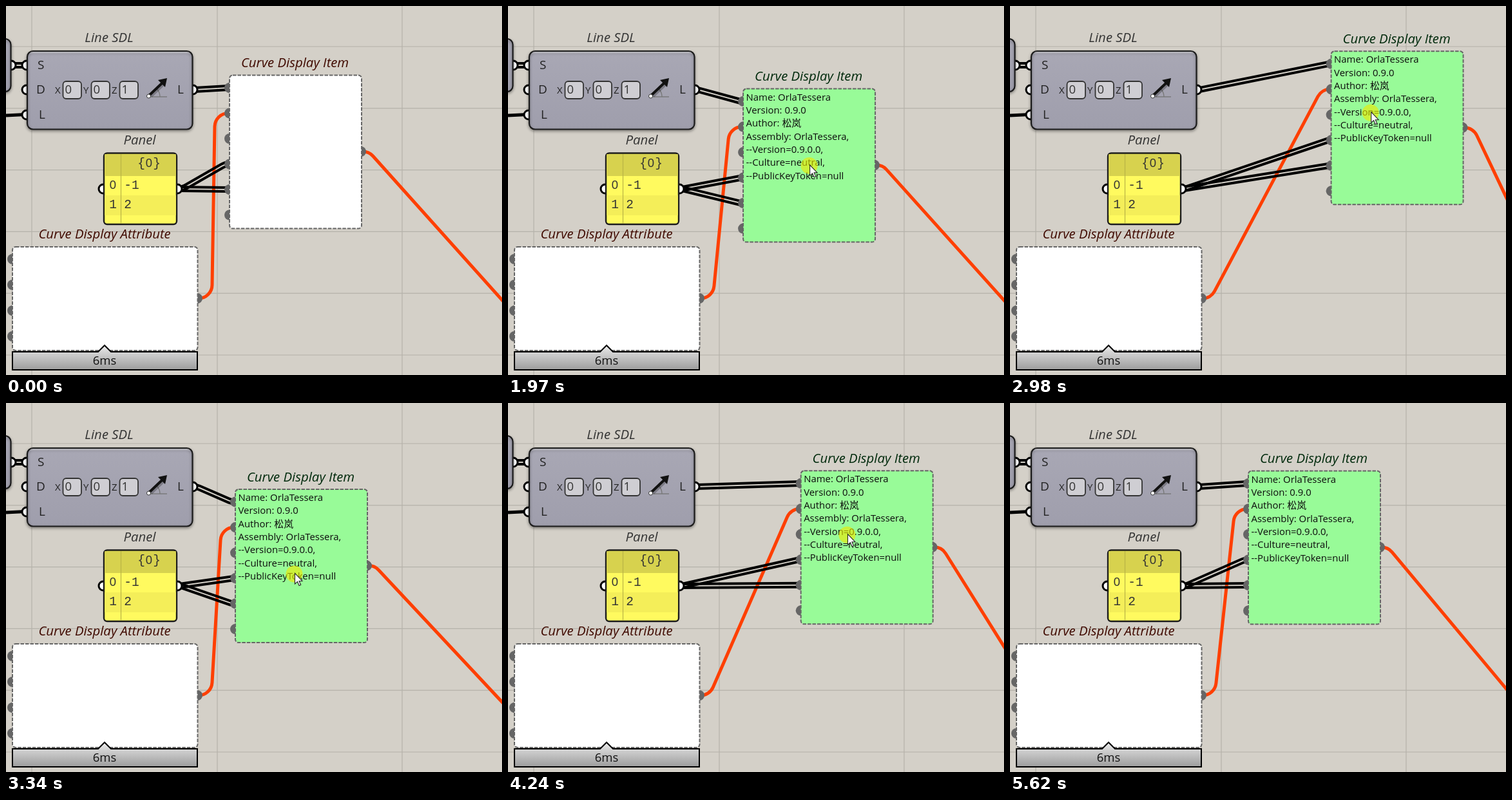
An HTML page with a canvas that plays this animation: 770x573 px, repeating every 6.22 s.

```html
<!DOCTYPE html>
<html lang="en">
<head>
<meta charset="utf-8">
<title>Dragging a node</title>
<style>
  html, body { margin: 0; height: 100%; overflow: hidden; background: #d4d0c8; }
  canvas { display: block; }
</style>
</head>
<body>
<canvas id="stage" width="770" height="573"></canvas>
<script>
const ctx = document.getElementById('stage').getContext('2d');
const LOOP = 6220, SHOW = 70, PRESS = 1420, RELEASE = 5060, HIDE = 5620, LAG = 70;
const SANS = '"Open Sans", "Noto Sans CJK SC", "Noto Sans CJK JP", sans-serif';
const MONO = '"Liberation Mono", monospace';
const GRAY = '#666', RED = '#ff3f00', BLACK = '#000', BEND = 21;
const INFO = ['Name: OrlaTessera', 'Version: 0.9.0', 'Author: 松岚', 'Assembly: OrlaTessera,',
  '--Version=0.9.0.0,', '--Culture=neutral,', '--PublicKeyToken=null'];

// Keys are [time, x, y]
const nodeKeys = [
  [1420, 346, 107], [1700, 352, 112], [1970, 364, 128], [2200, 386, 168], [2400, 468, 213],
  [2580, 523, 193], [2710, 546, 155], [2850, 540, 100], [2980, 498, 70], [3060, 455, 56],
  [3200, 388, 88], [3380, 350, 146], [3550, 350, 195], [3680, 369, 223], [3770, 388, 231],
  [3900, 437, 206], [4030, 476, 150], [4130, 482, 118], [4240, 454, 105], [4330, 420, 93],
  [4470, 386, 91], [4720, 370, 98], [4860, 369, 105]];
const enterKeys = [[70, 590, 423], [350, 500, 290], [680, 450, 216], [1050, 497, 295],
  [1300, 452, 220], [1420, 448, 216]];
const leaveKeys = [[5060, 470, 214], [5250, 490, 280], [5550, 551, 542]];

// Smooth curve through the keys, at rest at both ends
function follow(keys, t) {
  const last = keys.length - 1;
  if (t <= keys[0][0]) return keys[0].slice(1);
  if (t >= keys[last][0]) return keys[last].slice(1);
  const i = keys.findIndex(k => k[0] > t) - 1;
  const a = keys[i], b = keys[i + 1], span = b[0] - a[0], u = (t - a[0]) / span;
  const speed = (j, c) => j === 0 || j === last ? 0
    : (keys[j + 1][c] - keys[j - 1][c]) / (keys[j + 1][0] - keys[j - 1][0]);
  return [1, 2].map(c => {
    const e = u * u * (3 - 2 * u);
    return a[c] + (b[c] - a[c]) * e
      + span * u * (1 - u) * ((1 - u) * speed(i, c) - u * speed(i + 1, c));
  });
}

function stroke(color, width) {
  ctx.strokeStyle = color;
  ctx.lineWidth = width;
  ctx.stroke();
}

function line(color, width, ...points) {
  ctx.beginPath();
  points.forEach(p => ctx.lineTo(...p));
  stroke(color, width);
}

function circle(x, y, r, fill, border) {
  ctx.beginPath();
  ctx.arc(x, y, r, 0, 7);
  ctx.fillStyle = fill;
  ctx.fill();
  if (border) stroke(border, 3);
}

function box(x, y, w, h, r, fill, border, width) {
  ctx.beginPath();
  ctx.roundRect(x, y, w, h, r);
  ctx.fillStyle = fill;
  ctx.fill();
  stroke(border, width);
}

function text(str, x, y, size, color = '#222', align = 'left', family = SANS, style = '') {
  ctx.font = `${style} ${size}px ${family}`;
  ctx.fillStyle = color;
  ctx.textAlign = align;
  ctx.fillText(str, x, y);
}

const title = (str, x, y, color) => text(str, x, y, 20.4, color, 'center', SANS, 'italic');

// Two arcs joined by their common tangent; shift gives a parallel wire
function wire(x0, y0, x1, y1, color, width, shift = 0) {
  const dx = x1 - x0, rise = Math.abs(y1 - y0) - 2 * BEND, side = y1 < y0 ? -1 : 1;
  const angle = Math.atan2(rise, dx) + Math.asin(Math.min(1, 2 * BEND / Math.hypot(dx, rise)));
  const k = Math.tan(angle / 2), r0 = BEND + shift, r1 = BEND - shift;
  y0 -= side * shift;
  y1 -= side * shift;
  ctx.beginPath();
  ctx.moveTo(x0, y0);
  ctx.arcTo(x0 + r0 * k, y0, x1 - r1 * k, y1, r0);
  ctx.arcTo(x1 - r1 * k, y1, x1, y1, r1);
  ctx.lineTo(x1, y1);
  stroke(color, width);
}

function doubleWire(x0, y0, x1, y1) {
  for (const shift of [-3, 3]) wire(x0, y0, x1, y1, BLACK, 4, shift);
}

function dashedNode(x, y, w, h, fill) {
  ctx.setLineDash([5.5, 2]);
  box(x, y, w, h, 5, fill, GRAY, 2);
  ctx.setLineDash([]);
}

function steelBody(x, y, w, h) {
  const g = ctx.createLinearGradient(0, y, 0, y + h);
  g.addColorStop(0, '#e2e2e8');
  g.addColorStop(0.04, '#a8a7b4');
  g.addColorStop(1, '#9f9eac');
  ctx.shadowColor = 'rgba(0,0,0,.35)';
  ctx.shadowBlur = 4;
  ctx.shadowOffsetY = 2;
  box(x, y, w, h, 9, g, '#1c1c1c', 2.2);
  ctx.shadowColor = 'transparent';
}

function drawGrid() {
  ctx.fillStyle = '#d4d0c8';
  ctx.fillRect(0, 0, 770, 573);
  for (const x of [40, 328, 615]) line('#b5b2aa', 1.2, [x, 0], [x, 573]);
  for (let i = 0; i < 6; i++) {
    const y = 63 + 95.8 * i;
    line('#b5b2aa', 1.2, [0, y], [770, y]);
  }
}

function drawLineNode() {
  line(BLACK, 4, [8, 89], [32, 89]);
  line(BLACK, 4, [8, 95], [32, 95]);
  line(BLACK, 5, [0, 170], [30, 168.5]);
  for (const [x, y] of [[8, 92], [32, 92], [32, 130], [32, 169], [290, 130]])
    circle(x, y, 7, '#fff', BLACK);
  steelBody(-30, 51, 37.5, 82);
  steelBody(33, 70, 256.5, 121.5);
  title('Line SDL', 160, 56, '#333');
  text('S', 49, 98, 19);
  text('D', 47, 136, 19);
  text('L', 51, 175, 19);
  text('L', 266, 136, 19);
  [['X', '0', 76], ['Y', '0', 120], ['Z', '1', 164]].forEach(([axis, value, x]) => {
    text(axis, x, 136, 15);
    box(x + 12.5, 117, 28.5, 27, 5, '#cfced3', '#333', 1.8);
    text(value, x + 15.5, 136, 18.5, '#333');
  });
  // Arrow icon
  line('#777', 1.4, [221, 141], [250, 141]);
  ctx.beginPath();
  ctx.arc(221, 141, 18, -0.75, 0);
  stroke('#777', 1.4);
  line('rgba(0,0,0,.25)', 5, [225, 140], [245, 121]);
  line('#111', 4, [222, 139], [242, 120]);
  ctx.beginPath();
  [[250, 112], [247, 126], [236, 115]].forEach(p => ctx.lineTo(...p));
  ctx.fillStyle = '#111';
  ctx.fill();
  circle(221.5, 140, 3, '#fff');
  stroke('#333', 1);
}

function drawPanel() {
  circle(151, 284, 7, '#fff', BLACK);
  circle(266, 284, 7, '#fff', BLACK);
  box(152, 228.5, 113, 110.5, 5, '#fffa5f', '#1c1c1c', 2.4);
  ctx.fillStyle = '#d7d24e';
  ctx.fillRect(153.2, 230, 110.6, 34);
  ctx.fillStyle = '#f4ee59';
  ctx.fillRect(153.2, 294, 110.6, 31);
  line('#b9b545', 1.2, [178.5, 230], [178.5, 338]);
  title('Panel', 207.5, 215, '#333');
  const mono = (s, x, y) => text(s, x, y, 19.5, '#333', 'center', MONO);
  const zero = (x, y) => text('0', x, y, 18.5, '#333', 'center', '"Liberation Sans", sans-serif');
  mono('{', 210, 250);
  zero(222, 250);
  mono('}', 234, 250);
  zero(166, 284);
  mono('-1', 195, 284);
  mono('1', 166, 314);
  mono('2', 189, 314);
}

function drawAttribute() {
  for (let i = 0; i < 4; i++) circle(10, 393 + 40 * i, 8, GRAY);
  circle(297, 454, 8, GRAY);
  dashedNode(10, 374, 287.5, 161, '#fff');
  title('Curve Display Attribute', 153, 361, '#400a00');
  const g = ctx.createLinearGradient(0, 527, 0, 565);
  g.addColorStop(0, '#eee');
  g.addColorStop(0.3, '#d2d2d2');
  g.addColorStop(1, '#9c9c9c');
  ctx.beginPath();
  [[10, 537], [143, 537], [153, 527], [163, 537], [297, 537], [297, 565], [10, 565]]
    .forEach(p => ctx.lineTo(...p));
  ctx.closePath();
  ctx.fillStyle = g;
  ctx.fill();
  stroke(BLACK, 2);
  text('6ms', 153, 557, 18.5, '#111', 'center');
}

function drawItem(x, y, selected) {
  for (let i = 0; i < 6; i++) circle(x + 1, y + 20 + 39.5 * i, 8, GRAY);
  circle(x + 205, y + 119, 8, GRAY);
  dashedNode(x + 1, y + 0.5, 205, 238, selected ? '#98fb98' : '#fff');
  title('Curve Display Item', x + 102.5, y - 12, selected ? '#002a0c' : '#400a00');
  if (selected) INFO.forEach((s, i) => text(s, x + 5.5, y + 18.5 + 20.35 * i, 14.9, '#0c0c0c'));
}

function drawCursor(x, y, pressed) {
  if (pressed) circle(x - 1, y + 1, 13, 'rgba(235,232,0,.62)');
  ctx.beginPath();
  [[0, 0], [0, 16.5], [4, 13], [6.6, 19], [9.2, 18], [6.6, 12], [11.5, 12]]
    .forEach(([dx, dy]) => ctx.lineTo(x + dx, y + dy));
  ctx.closePath();
  ctx.fillStyle = '#fff';
  ctx.fill();
  stroke('#222', 1.1);
}

function draw(t) {
  const [x, y] = follow(nodeKeys, t);
  drawGrid();
  wire(299, 454, x - 1, y + 59.5, RED, 5);
  wire(x + 208, y + 119, 950, 647, RED, 5);
  doubleWire(292, 130, x, y + 20);
  doubleWire(268, 284, x, y + 138.5);
  doubleWire(268, 284, x, y + 178);
  drawLineNode();
  drawPanel();
  drawAttribute();
  drawItem(x, y, t >= PRESS);
  if (t < SHOW || t >= HIDE) return;
  const pressed = t >= PRESS && t < RELEASE;
  let tip = follow(t < PRESS ? enterKeys : leaveKeys, t);
  if (pressed) {
    const [px, py] = follow(nodeKeys, t + LAG);
    tip = [px + 101, py + 109];
  }
  drawCursor(...tip, pressed);
}

function tick() {
  draw(performance.now() % LOOP);
  requestAnimationFrame(tick);
}
tick();
</script>
</body>
</html>
```
